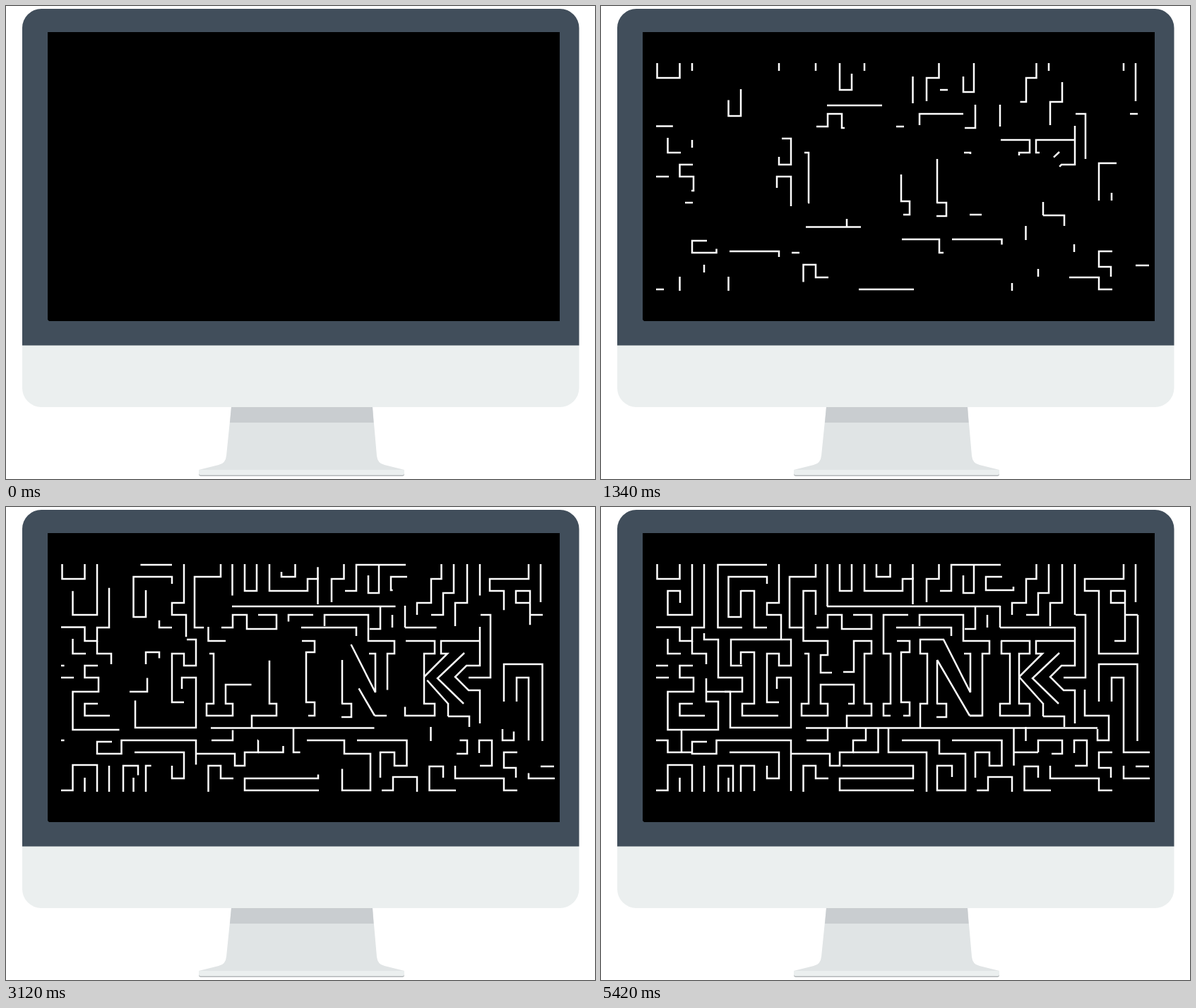
Recreate the animation shown at these times as an HTML page. Size 834x671 px, loop 5.54 s.

```html
<!DOCTYPE html>
<html lang="en">
<head>
<meta charset="utf-8">
<title>Maze on a monitor</title>
<style>
  html, body { margin: 0; width: 100%; height: 100%; overflow: hidden; background: #fff; }
  svg { display: block; width: 834px; height: 671px; }
  #maze { fill: none; stroke: #fff; stroke-width: 2.5; stroke-linejoin: miter; }
</style>
</head>
<body>
<svg viewBox="0 0 834 671">
  <!-- stand -->
  <path fill="#e0e4e5" d="M319 569H519L525 638Q526 649 536 651L564 658V662H273V658L301 651Q311 649 312 638Z"/>
  <path fill="#c9cdd0" d="M319 569H519L520.5 591H317Z"/>
  <path fill="#b3b7b9" d="M273 660H564V664Q564 667 561 667H276Q273 667 273 664Z"/>
  <path fill="#ebefef" d="M273 658H564V663Q564 665.5 561 665.5H276Q273 665.5 273 663Z"/>
  <!-- case and screen -->
  <path fill="#ebefef" d="M23 481H811.500V542A27 27 0 0 1 784.500 569H50A27 27 0 0 1 23 542Z"/>
  <path fill="#414e5b" d="M23 481.500V31A27 27 0 0 1 50 4H784.500A27 27 0 0 1 811.500 31V481.500Z"/>
  <path d="M59 37H784V447H61L59 445Z"/>

  <g id="maze">
    <g data-start="20">
      <path d="M111.500 81V102H79.500V81"/>
      <path d="M338 81V119H355V81"/>
      <path d="M478.500 81V102H461V135"/>
      <path d="M528 81V122H513V97"/>
      <path d="M616.500 81V102H602V136H582V153"/>
      <path d="M757 81V135"/>
      <path d="M441.500 100V138"/>
      <path d="M198 118V156H180.500V99H235V109"/>
      <path d="M320 141H565"/>
      <path d="M305 171H321V153H341V173H383V153H357"/>
      <path d="M451 169V153H513V190H550V208H540V296H522"/>
      <path d="M515 173H530V140"/>
      <path d="M565 140V171"/>
      <path d="M636 169V136H653V81"/>
      <path d="M672 153H686V242H655"/>
    </g>
    <g data-start="20">
      <path d="M566 190H607V208H592V279H607V296H565V279H579V208H567V190"/>
      <path d="M671 190H616V208H625L592 241"/>
      <path d="M671 170V225H652L636 241L655 260H671V307"/>
      <path d="M626 297V278"/>
      <path d="M626 297H656V312"/>
      <path d="M476 217V279"/>
      <path d="M475 279H489V298H475"/>
      <path d="M539 296H522"/>
      <path d="M428 296H437V277H425V206H437V190H419"/>
      <path d="M288 208H294V279H284V296H321V279H311V252H358V279H350"/>
      <path d="M256 188H269V225H252V208H235V277H252"/>
      <path d="M249 258V242H269V313H183V262H150"/>
    </g>
    <g data-start="20">
      <path d="M94.500 187V208H113"/>
      <path d="M130 225H111.500V242H131V262H94.500V316H166V276H149V243"/>
      <path d="M78 242H96"/>
      <path d="M290 313.500H703"/>
      <path d="M150 333H129V350H163.500V331H269V403"/>
      <path d="M182 348H252V385H235V367"/>
      <path d="M111.500 404V384"/>
      <path d="M180.500 404V384"/>
      <path d="M322 385H304V367H286.500V404"/>
      <path d="M443 402H338V385H442V367H342"/>
      <path d="M426 331H479V350H516V402H476V367H497V383"/>
      <path d="M497 331H567.500V367H550V348H530V384"/>
      <path d="M601.500 312V332"/>
      <path d="M705 276V223H759.500V332"/>
      <path d="M724 348H705V370H722V384"/>
      <path d="M724 402H705V385H636V367"/>
      <path d="M757 368H776"/>
    </g>

    <g data-start="780">
      <path d="M78 170.500H111.500V190H129V171H146V81"/>
    </g>
    <g data-start="1050">
      <path d="M129 81V153H94.500V119H112V136"/>
      <path d="M252 81V136H235V153H255V188H184V225H200"/>
      <path d="M304 81V99H267V171H286.500V119H304V153"/>
      <path d="M373 81V119H427V102H441.500V81"/>
      <path d="M480 119H496V82H566"/>
      <path d="M634 81V122H619V153H602"/>
      <path d="M740 81V102H685V119H705V208H760V153"/>
      <path d="M760 153H742V119H722V136H742V190H727"/>
      <path d="M418 171H496V183"/>
      <path d="M129 190V208H149V223"/>
      <path d="M514 208H523V263L485 188H452V208H462V279H452V313"/>
      <path d="M649 207L611 243L648 279"/>
    </g>
    <g data-start="1050">
      <path d="M723 276V242H740V348H777"/>
      <path d="M130 279H111.500V296H147"/>
      <path d="M348 313V296H383V279H373V208H383V190H358V234H343"/>
      <path d="M270 350H324V367H338V348H357V331H375V313"/>
      <path d="M670 349V331H688V367H671"/>
      <path d="M619 384V368H599.500V402H637"/>
      <path d="M582 404V383H548V402H532"/>
      <path d="M146 367V404"/>
      <path d="M78 402H94.500V366H129V404"/>
    </g>

    <g data-start="1890">
      <path d="M166 404V367H187V404"/>
    </g>
    <g data-start="2270">
      <path d="M235 82H165.500V171H200"/>
      <path d="M320.500 81V141"/>
      <path d="M409.500 81V99H390V81"/>
      <path d="M568 99H545V118H584V113"/>
      <path d="M547 153V171"/>
      <path d="M671 81V153"/>
      <path d="M565 171H671"/>
      <path d="M435 153H400V208H410V279H400V296H410"/>
      <path d="M286.500 170V190H321V210H311V235H327"/>
      <path d="M198 223V206H217V279H200V296H251"/>
      <path d="M175 262H200V242H194"/>
      <path d="M522 296L476 217"/>
      <path d="M626 279L592 241"/>
    </g>
    <g data-start="2270">
      <path d="M638 350H653V331H619V348"/>
      <path d="M703 315V331H719V296H685V259"/>
      <path d="M777 385H740V367"/>
      <path d="M198 404V367H217V403"/>
      <path d="M291 331H321V313"/>
      <path d="M357 348H392.500V313"/>
      <path d="M407 313V348H461V404"/>
    </g>

    <g data-start="2500">
      <path d="M235 171H217V119H198"/>
    </g>
    <g data-start="3000">
      <path d="M78 225H95"/>
      <path d="M78 331H94.500V348H129"/>
    </g>
    <g data-start="3700">
      <path d="M194 242H166V188H146V171"/>
      <path d="M619 348H585"/>
    </g>
    <g data-start="4440">
      <path d="M114 348V316"/>
      <path d="M584.500 313V367"/>
    </g>
  </g>
</svg>
<script>
  const LOOP = 5540, TICK = 20;

  // drawn length (px) by age (ms), shared by every wall
  const growth = [
    [0, 0], [290, 11], [520, 21], [870, 46], [1320, 78],
    [1900, 126], [2500, 176], [3700, 287], [5020, 411], [5540, 460]
  ];

  function drawn(age) {
    if (age <= 0) return 0;
    const i = growth.findIndex(([ms]) => ms >= age);
    const [t0, a] = growth[i - 1], [t1, b] = growth[i];
    return a + (b - a) * (age - t0) / (t1 - t0);
  }

  const walls = [...document.querySelectorAll('#maze path')].map(el => ({
    el, start: +el.parentNode.dataset.start, size: el.getTotalLength()
  }));

  function render(t) {
    for (const { el, start, size } of walls) {
      const len = Math.min(drawn(t - start), size);
      el.style.visibility = len > 0 ? 'visible' : 'hidden';
      el.style.strokeDasharray = len < size ? `${len} 2000` : 'none';
    }
  }

  const origin = performance.now();
  function frame(now) {
    const t = Math.max(0, now - origin) % LOOP;
    render(Math.floor(t / TICK) * TICK);
    requestAnimationFrame(frame);
  }
  render(0);
  requestAnimationFrame(frame);
</script>
</body>
</html>
```
